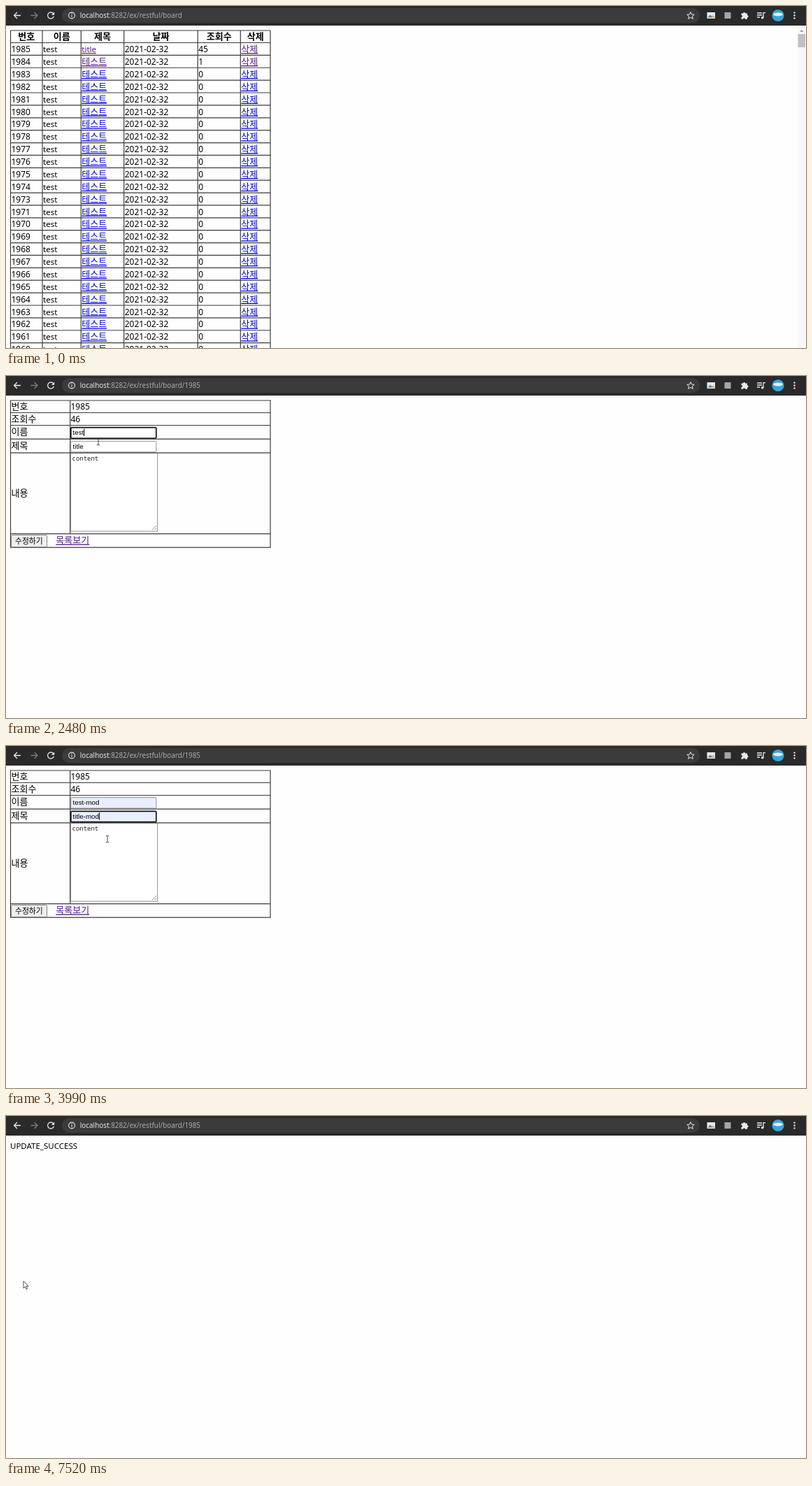
An HTML page for the animation above (8000 ms loop, 1144 by 489 pixels).

```html
<!DOCTYPE html>
<html lang="ko">
<head>
<meta charset="utf-8">
<title>Board</title>
<style>
html, body { margin: 0; width: 100%; height: 100%; overflow: hidden; background: #fefefe; }
svg { display: block; width: 100vw; height: 100vh; }
text { font: 11.5px "Noto Sans", "Noto Sans CJK KR", sans-serif; fill: #000; white-space: pre; }
.num { font-size: 12px; }
.ko { font: 13px "Noto Sans CJK KR", "Noto Sans CJK", sans-serif; }
.th { font-weight: 700; text-anchor: middle; }
.link { fill: #0000ee; text-decoration: underline; }
.seen { fill: #551a8b; }
.url { font-size: 9.9px; fill: #e8eaed; }
.btn { font-size: 10.8px; }
.field { font: 9.75px "Liberation Sans", Arial, sans-serif; }
.mono { font: 8.95px "Noto Sans Mono", monospace; fill: #222; }
.item { font-size: 9.5px; fill: #222; }
.grid { fill: none; stroke: #3c3c3c; stroke-width: 1.2; }
.box { fill: #fff; stroke: #767676; stroke-width: .8; }
.box.auto { fill: #e8f0fe; }
.box.focus { stroke: #101010; stroke-width: 1.7; }
.icon { fill: none; stroke: #e8eaed; stroke-width: 1.3; }
</style>
</head>
<body>
<svg viewBox="0 0 1144 489" preserveAspectRatio="none">
  <g id="list">
    <rect x="1132" y="28" width="12" height="461" fill="#f8f8f8"/>
    <rect x="1132.5" y="40" width="10.5" height="19" fill="#c1c1c1"/>
    <path d="M1135 37l2.8-3.2 2.8 3.2z" fill="#a3a3a3"/>
  </g>

  <g id="form">
    <path class="grid" d="M6.5 35H378V245.2H6.5zM6.5 52.5H378M6.5 70.5H378M6.5 90.2H378M6.5 109.8H378M6.5 225.6H378M91.7 35V225.6"/>
    <text class="ko" x="7.5" y="48">번호</text>
    <text class="ko" x="7.5" y="66">조회수</text>
    <text class="ko" x="7.5" y="84.3">이름</text>
    <text class="ko" x="7.5" y="104">제목</text>
    <text class="ko" x="7.5" y="172">내용</text>
    <text class="num" x="92.5" y="48.3">1985</text>
    <text class="num" x="92.5" y="66">46</text>
    <rect id="nameBox" class="box" x="92.8" y="73.6" width="122" height="15.4" rx="1.5"/>
    <rect id="titleBox" class="box" x="92.8" y="93.3" width="122" height="15.4" rx="1.5"/>
    <rect id="bodyBox" class="box" x="92.7" y="110.5" width="124" height="111.5"/>
    <path d="M209 220l6-6M212.5 220l2.5-2.5" stroke="#777" stroke-width=".8"/>
    <text id="name" class="field" x="95.5" y="84.2"></text>
    <text id="title" class="field" x="95.5" y="103.8"></text>
    <text id="body" class="mono" x="94.6" y="121.3"></text>
    <rect id="caret" width="1" height="10.5"/>
    <rect id="btn" x="7.6" y="227.4" width="51" height="17" rx="1.5" stroke="#767676" stroke-width=".9"/>
    <text class="ko btn" x="13" y="239.8">수정하기</text>
    <text class="ko link seen" x="71.3" y="239.4">목록보기</text>
    <g id="popup">
      <rect x="91.5" y="1.5" width="144" height="90" rx="2" fill="#000" opacity=".08"/>
      <rect x="92.5" y=".5" width="141.5" height="88" rx="1.5" fill="#fff" stroke="#c4c4c4" stroke-width=".8"/>
      <rect id="hover" x="93" y="5" width="140.5" height="25" fill="#e8e8e9"/>
      <text class="item" x="100" y="21"></text>
      <text class="item" x="100" y="46"></text>
      <text class="item" x="100" y="71"></text>
    </g>
  </g>

  <text id="done" x="6" y="47">UPDATE_SUCCESS</text>

  <g id="toolbar">
    <rect width="1144" height="28" fill="#2a2a2b"/>
    <rect x="80" y="3" width="912" height="21" rx="10.5" fill="#3b3b3c"/>
    <path class="icon" d="M21 13.5H11.8M16 9l-4.5 4.5 4.5 4.5"/>
    <path class="icon" style="stroke:#7c7c7c" d="M35.5 13.5h9.2M40.5 9l4.5 4.5-4.5 4.5"/>
    <g id="reload">
      <path class="icon" d="M67.6 10.7A4.5 4.5 0 1 0 68.4 14.8"/>
      <path d="M69.2 8.4v4.4h-4.4z" fill="#e8eaed"/>
    </g>
    <path id="stop" class="icon" d="M60 9.5l8 8M68 9.5l-8 8"/>
    <circle class="icon" style="stroke-width:1.1" cx="94" cy="13.5" r="4.4"/>
    <path class="icon" style="stroke-width:1.1" d="M94 12.8v3.2M94 10.8v1.1"/>
    <text class="url" x="105.8" y="17.2">localhost<tspan id="path" fill="#a9abae"></tspan></text>
    <path class="icon" style="stroke-width:1" d="M979 8.6l1.5 3.4 3.7.3-2.8 2.4.9 3.6-3.3-1.9-3.3 1.9.9-3.6-2.8-2.4 3.7-.3z"/>
    <rect x="1002.5" y="9" width="11.5" height="9" fill="#e6e9ec"/>
    <path d="M1003.5 16.5l3.5-4 3 3 1.5-1.2 2 2.2z" fill="#4d86ad"/>
    <circle cx="1010.8" cy="15.3" r="1.8" fill="#e3b72f"/>
    <rect x="1027.5" y="9" width="9" height="9" fill="#a3a5a6"/>
    <path d="M1051.5 10.5h2.5a1.6 1.6 0 1 1 3.2 0h2.8v2.7a1.6 1.6 0 1 1 0 3.2v2.4h-3a1.5 1.5 0 0 0-3 0h-2.5v-2.8a1.5 1.5 0 0 0 0-3z" fill="#e8eaed"/>
    <path class="icon" d="M1074 10h7M1074 13h7M1074 16h4M1083 17V9.6h3"/>
    <circle cx="1081.6" cy="16.8" r="1.8" fill="#e8eaed"/>
    <circle cx="1104" cy="13.5" r="8.6" fill="#36a6db"/>
    <ellipse cx="1104" cy="12" rx="6.8" ry="2.6" fill="#e4f2f8"/>
    <g fill="#e8eaed"><circle cx="1127.5" cy="9.6" r="1.2"/><circle cx="1127.5" cy="13.5" r="1.2"/><circle cx="1127.5" cy="17.4" r="1.2"/></g>
  </g>

  <g id="cursor">
    <path id="arrow" d="M0 0V10.2l2.4-2.2 1.6 3.6 1.6-.7-1.6-3.5h3.1z" fill="#fff" stroke="#222" stroke-width=".8"/>
    <path id="hand" d="M-1.2 1.2Q-1-.2 0 0 1.2 0 1.2 1.2V5l4.3 1.1Q6.6 6.5 6.4 8L5.6 12V14.2H-.6V12.6L-3.6 8.6Q-3.6 7.2-2.4 7.6L-1.2 8.8z" fill="#fff" stroke="#222" stroke-width=".85"/>
    <path id="ibeam" d="M-2.2-4.6H-.6L0-4.1.6-4.6H2.2M0-4.1V4.1M-2.2 4.6H-.6L0 4.1.6 4.6H2.2" fill="none" stroke="#333" stroke-width=".9"/>
  </g>
</svg>
<script>
const LOOP = 8000, TICK = 107.2, SHIFT = 18;
const $ = id => document.getElementById(id);
const show = (id, on) => { $(id).style.display = on ? '' : 'none'; };

function add(parent, tag, attrs, label = '') {
  const el = document.createElementNS('http://www.w3.org/2000/svg', tag);
  for (const key in attrs) el.setAttribute(key, attrs[key]);
  el.textContent = label;
  parent.appendChild(el);
}

function buildList() {
  const list = $('list');
  const cols = [6.5, 52, 107.3, 168.7, 274.2, 335.3, 378];
  const heads = ['번호', '이름', '제목', '날짜', '조회수', '삭제'];
  const top = 52.5, pitch = 17.88;
  let d = 'M6.5 35H378';
  cols.forEach(x => { d += `M${x} 35V489`; });
  const put = (col, y, cls, label) => add(list, 'text', { x: cols[col] + 1, y, class: cls }, label);
  heads.forEach((label, i) =>
    add(list, 'text', { x: (cols[i] + cols[i + 1]) / 2, y: 48, class: 'ko th' }, label));
  for (let i = 0; i < 25; i++) {
    const y = top + pitch * i, base = y + 13.6;
    const seen = i < 2 ? ' seen' : '';
    d += `M6.5 ${y}H378`;
    put(0, base, 'num', 1985 - i - (i > 12 ? 1 : 0));   // 1972 was deleted
    put(1, base, '', 'test');
    put(2, base, (i ? 'ko ' : '') + 'link' + seen, i ? '테스트' : 'title');
    put(3, base, 'num', '2021-02-32');
    put(4, base, 'num', [45, 1][i] || 0);
    put(5, base, 'ko link' + seen, '삭제');
  }
  add(list, 'path', { class: 'grid', d });
}

// pointer path: tick, x, y
const track = [
  [3, 813, 450], [4, 560, 290], [5, 360, 165], [6, 240, 100], [7, 170, 70], [8, 142, 60],
  [9, 124, 52], [10, 131, 54], [12, 123, 57], [17, 123, 58], [20, 125, 82], [22, 130, 88],
  [23, 132, 94], [26, 137, 104], [29, 138, 110], [31, 138, 110], [33, 138, 101],
  [35, 143, 122], [37, 145, 133], [40, 145, 134], [44, 140, 138], [55, 140, 138],
  [56, 125, 250], [57, 100, 344], [58, 100, 344], [60, 72, 284], [62, 46, 240], [65, 25, 236]
];

function pointer(k) {
  const i = track.findIndex(p => p[0] > k);
  if (i < 0) return track[track.length - 1].slice(1);
  const a = track[Math.max(0, i - 1)], b = track[i];
  const f = Math.max(0, (k - a[0]) / (b[0] - a[0]));
  return [a[1] + (b[1] - a[1]) * f, a[2] + (b[2] - a[2]) * f];
}

const within = (k, a, b) => k >= a && k < b;

function render(t) {
  const k = Math.floor((t + SHIFT) / TICK);
  const page = k < 15 ? 'list' : k < 70 ? 'form' : 'done';
  ['list', 'form', 'done'].forEach(id => show(id, id === page));

  const loading = k === 14 || k === 69;
  show('reload', !loading);
  show('stop', loading);
  $('path').textContent = ':8282/ex/restful/board' + (k < 15 ? '' : '/1985');

  const focus = within(k, 21, 33) ? 'name' : within(k, 33, 39) ? 'title' : within(k, 39, 62) ? 'body' : '';
  const filled = { name: k >= 26, title: k >= 35 };
  const typed = k < 47 ? 0 : k < 49 ? 1 : Math.min(4, k - 47);
  $('name').textContent = filled.name ? 'test-mod' : 'test';
  $('title').textContent = filled.title ? 'title-mod' : 'title';
  $('body').textContent = 'content' + '-mod'.slice(0, typed);
  ['name', 'title', 'body'].forEach(id => {
    $(id + 'Box').setAttribute('class', 'box' + (filled[id] ? ' auto' : '') + (focus === id ? ' focus' : ''));
  });

  show('caret', page === 'form' && focus);
  if (page === 'form' && focus) {
    const el = $(focus);
    $('caret').setAttribute('x', +el.getAttribute('x') + el.getComputedTextLength());
    $('caret').setAttribute('y', el.getAttribute('y') - 8.7);
  }

  const open = within(k, 24, 30) ? 'test' : within(k, 34, 37) ? 'title' : '';
  show('popup', open);
  if (open) {
    $('popup').setAttribute('transform', `translate(0 ${open === 'test' ? 91 : 110.5})`);
    show('hover', filled[open === 'test' ? 'name' : 'title']);
    $('popup').querySelectorAll('text').forEach((el, i) => { el.textContent = open + ['-mod', '', '1'][i]; });
  }

  const [x, y] = pointer(k);
  $('btn').setAttribute('fill', page === 'form' && x < 59 && y > 227 && y < 245 ? '#e3e3e3' : '#efefef');
  const kind = within(k, 9, 15) ? 'hand' : within(k, 19, 56) && !open ? 'ibeam' : 'arrow';
  ['arrow', 'hand', 'ibeam'].forEach(id => show(id, id === kind));
  show('cursor', k >= 3);
  $('cursor').setAttribute('transform', `translate(${x} ${y})`);
}

buildList();
const start = performance.now();
function loop() {
  render((performance.now() - start) % LOOP);
  requestAnimationFrame(loop);
}
loop();
</script>
</body>
</html>
```
